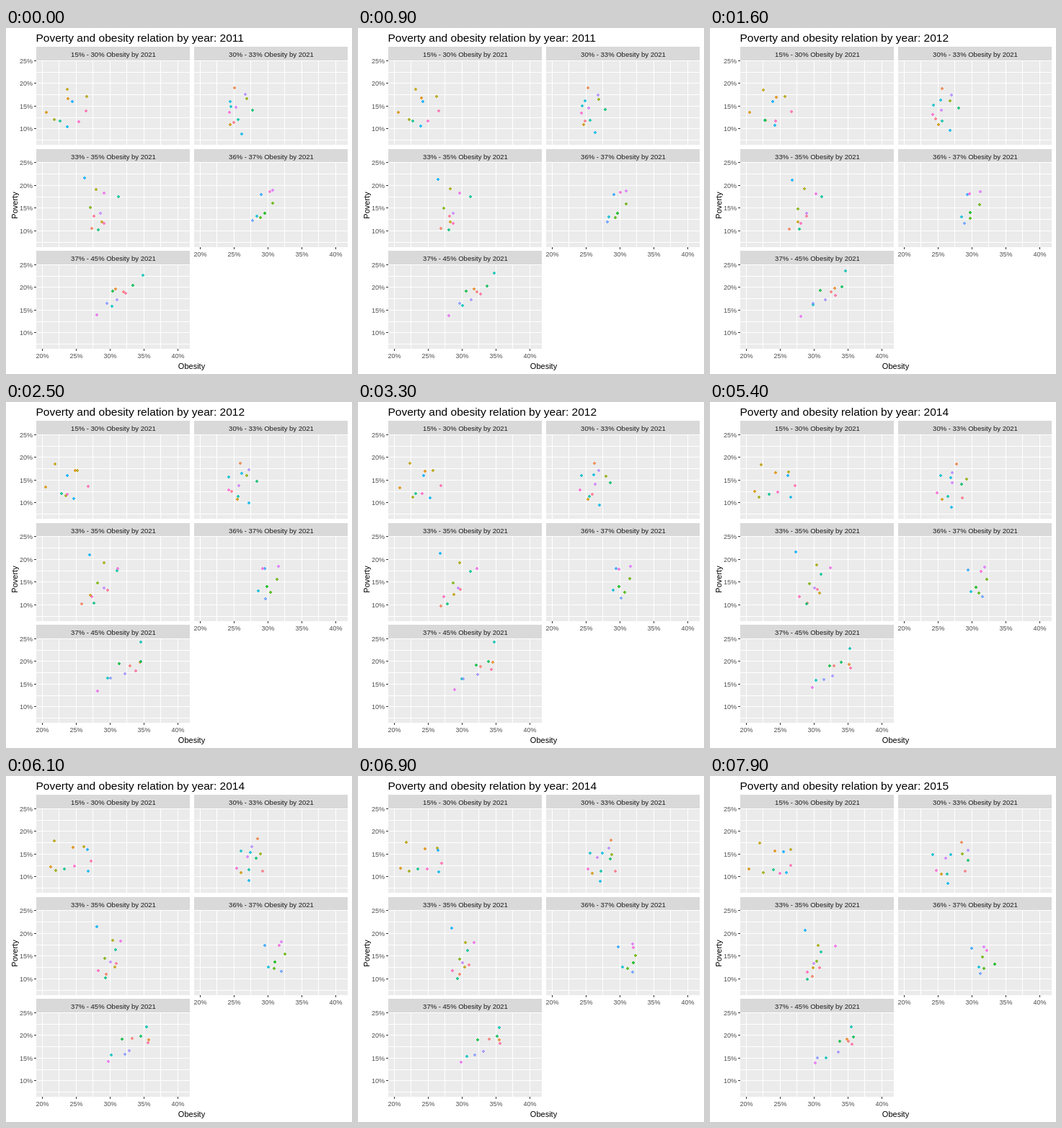
Write an HTML page with a canvas that moves like this. It is 480 by 480 pixels and loops after 8000 ms.

```html
<!DOCTYPE html>
<html lang="en">
<head>
<meta charset="utf-8">
<title>Poverty and obesity</title>
<style>
  html, body { margin: 0; width: 100%; height: 100%; overflow: hidden; background: #fff; }
  canvas { display: block; }
</style>
</head>
<body>
<canvas id="chart" width="480" height="480"></canvas>
<script>
const ctx = document.getElementById('chart').getContext('2d');
const LOOP = 8000, HOLD = 500, STEP = 100, STEPS_PER_YEAR = 20, FIRST_YEAR = 2011;
const FONT = '"Liberation Sans", Arial, sans-serif';

const panels = [
  { col: 0, row: 0, label: '15% - 30%' },
  { col: 1, row: 0, label: '30% - 33%' },
  { col: 0, row: 1, label: '33% - 35%' },
  { col: 1, row: 1, label: '36% - 37%', xAxis: true },
  { col: 0, row: 2, label: '37% - 45%', xAxis: true },
];

// Percent to pixel, within a panel
const scaleX = (panel, v) => Math.floor(50.3 + 218.73 * panel.col + (v - 20) * 9.41);
const scaleY = (panel, v) => Math.floor(139.9 + 141.475 * panel.row - (v - 10) * 6.3);

// Evenly spaced hues in polar LUV space, lightness 65, chroma 100
function hueColor(degrees) {
  const L = 65, C = 100, h = degrees * Math.PI / 180;
  const Y = ((L + 16) / 116) ** 3;
  const u = C * Math.cos(h) / (13 * L) + 0.1978;
  const v = C * Math.sin(h) / (13 * L) + 0.4683;
  const X = 9 * Y * u / (4 * v), Z = 3 * Y / v - 5 * Y - X / 3;
  const channel = c => {
    const g = c > 0.0031308 ? 1.055 * c ** (1 / 2.4) - 0.055 : 12.92 * c;
    return Math.round(255 * Math.min(1, Math.max(0, g)));
  };
  return 'rgb(' + [
    channel(3.2405 * X - 1.5371 * Y - 0.4985 * Z),
    channel(-0.9693 * X + 1.876 * Y + 0.0416 * Z),
    channel(0.0556 * X - 0.204 * Y + 1.0572 * Z),
  ].join() + ')';
}

const tracks = [];
const track = (panel, obesity, poverty) => tracks.push({ panel: panels[panel - 1], obesity, poverty });

// Panel, then yearly obesity and poverty rates
track(5, [32.0, 33.0, 32.4, 33.5, 35.6], [19.0, 19.0, 18.7, 19.3, 18.5]);
track(3, [27.4, 25.7, 28.4, 29.7, 29.8], [10.5, 10.1, 9.3, 11.2, 10.3]);
track(2, [25.1, 26.0, 26.8, 28.9, 28.4], [19.0, 18.7, 18.6, 18.2, 17.4]);
track(5, [30.9, 34.5, 34.6, 35.9, 34.5], [19.5, 19.8, 19.7, 18.9, 19.1]);
track(1, [23.8, 25.0, 24.1, 24.7, 24.2], [16.6, 17.0, 16.8, 16.4, 15.3]);
track(1, [20.7, 20.5, 21.3, 21.3, 20.2], [13.5, 13.5, 13.0, 12.0, 11.5]);
track(2, [24.5, 25.6, 25.0, 26.3, 25.3], [10.9, 10.7, 10.7, 10.8, 10.5]);
track(3, [28.8, 26.9, 31.1, 30.7, 29.7], [11.9, 12.0, 12.4, 12.5, 12.4]);
track(1, [23.7, 21.9, 22.9, 21.7, 22.1], [18.7, 18.4, 18.9, 17.7, 17.3]);
track(1, [26.6, 25.2, 26.4, 26.2, 26.8], [17.0, 17.1, 17.0, 16.5, 15.7]);
track(3, [28.0, 29.1, 30.3, 30.5, 30.7], [19.1, 19.2, 19.0, 18.3, 17.0]);
track(1, [21.8, 23.6, 21.8, 22.1, 22.7], [12.0, 11.6, 10.8, 11.4, 10.6]);
track(2, [27.0, 26.8, 29.6, 28.9, 28.6], [16.5, 15.9, 15.6, 14.8, 15.1]);
track(3, [27.1, 28.1, 29.4, 29.3, 30.8], [15.0, 14.7, 14.7, 14.4, 13.6]);
track(4, [30.8, 31.4, 31.8, 32.7, 31.3], [16.0, 15.6, 15.9, 15.2, 14.5]);
track(4, [29.0, 30.4, 31.3, 30.9, 32.1], [12.8, 12.7, 12.7, 12.2, 12.2]);
track(4, [29.6, 29.9, 30.0, 31.3, 34.2], [13.8, 14.0, 14.0, 13.6, 13.0]);
track(5, [30.4, 31.3, 33.2, 31.6, 34.6], [19.1, 19.4, 18.8, 19.1, 18.5]);
track(5, [33.4, 34.7, 33.1, 34.9, 36.2], [20.4, 19.9, 19.8, 19.8, 19.6]);
track(2, [27.8, 28.4, 28.9, 28.2, 30.0], [14.1, 14.7, 14.0, 14.1, 13.4]);
track(3, [28.3, 27.6, 28.3, 29.6, 28.9], [10.1, 10.3, 10.1, 10.1, 9.7]);
track(1, [22.7, 22.9, 23.6, 23.3, 24.3], [11.6, 11.9, 11.9, 11.6, 11.5]);
track(3, [31.3, 31.1, 31.5, 30.7, 31.2], [17.5, 17.4, 17.0, 16.2, 15.8]);
track(2, [25.7, 25.7, 25.5, 27.6, 26.1], [11.9, 11.4, 11.2, 11.5, 10.2]);
track(5, [34.9, 34.6, 35.1, 35.5, 35.6], [22.6, 24.2, 24.0, 21.5, 22.0]);
track(5, [30.3, 29.6, 30.4, 30.2, 32.4], [15.8, 16.2, 15.9, 15.5, 14.8]);
track(2, [24.6, 24.3, 24.6, 26.4, 23.6], [14.8, 15.5, 16.5, 15.4, 14.6]);
track(4, [28.4, 28.6, 29.6, 30.2, 31.4], [13.1, 13.0, 13.2, 12.4, 12.6]);
track(2, [24.5, 26.2, 26.2, 27.7, 26.7], [15.9, 16.4, 15.8, 15.2, 14.7]);
track(2, [26.2, 27.3, 26.7, 27.4, 26.3], [8.8, 10.0, 8.7, 9.2, 8.2]);
track(1, [23.7, 24.6, 26.3, 26.9, 25.6], [10.4, 10.8, 11.4, 11.1, 10.8]);
track(3, [26.3, 27.1, 26.4, 28.4, 28.8], [21.5, 20.8, 21.9, 21.3, 20.4]);
track(1, [24.5, 23.6, 25.4, 27.0, 25.0], [16.0, 15.9, 16.0, 15.9, 15.4]);
track(4, [29.1, 29.6, 29.4, 29.7, 30.1], [17.9, 18.0, 17.9, 17.2, 16.4]);
track(4, [27.8, 29.7, 31.0, 32.2, 31.0], [12.2, 11.2, 11.8, 11.5, 11.0]);
track(5, [29.6, 30.1, 30.4, 32.6, 29.8], [16.4, 16.3, 16.0, 15.8, 14.8]);
track(5, [31.1, 32.2, 32.5, 33.0, 33.9], [17.2, 17.2, 16.8, 16.6, 16.1]);
track(2, [26.7, 27.3, 26.5, 27.9, 30.1], [17.5, 17.2, 16.7, 16.6, 15.4]);
track(3, [28.6, 29.1, 30.0, 30.2, 30.0], [13.8, 13.7, 13.7, 13.6, 13.2]);
track(2, [25.4, 25.7, 27.3, 27.0, 26.0], [14.7, 13.7, 14.3, 14.3, 13.9]);
track(4, [30.8, 31.6, 31.7, 32.1, 31.7], [18.9, 18.3, 18.6, 18.0, 16.6]);
track(5, [28.1, 28.1, 29.9, 29.8, 30.4], [13.9, 13.4, 14.2, 14.2, 13.7]);
track(3, [29.2, 31.1, 33.7, 31.2, 33.8], [18.3, 17.9, 17.8, 18.3, 16.7]);
track(4, [30.4, 29.2, 30.9, 31.9, 32.4], [18.5, 17.9, 17.5, 17.2, 15.9]);
track(2, [24.4, 24.3, 24.1, 25.7, 24.5], [13.5, 12.8, 12.7, 11.7, 11.3]);
track(1, [25.4, 23.7, 24.7, 24.8, 25.1], [11.5, 11.8, 12.3, 12.2, 10.2]);
track(3, [29.2, 27.4, 27.2, 28.5, 29.2], [11.5, 11.7, 11.7, 11.8, 11.2]);
track(1, [26.5, 26.8, 27.2, 27.3, 26.4], [13.9, 13.5, 14.1, 13.2, 12.2]);
track(5, [32.4, 33.8, 35.1, 35.7, 35.6], [18.6, 17.8, 18.5, 18.3, 17.9]);
track(3, [27.7, 29.7, 29.8, 31.2, 30.7], [13.1, 13.2, 13.5, 13.2, 12.1]);
track(2, [25.0, 24.6, 27.8, 29.5, 29.0], [11.3, 12.6, 10.9, 11.2, 11.1]);
tracks.forEach((t, i) => t.color = hueColor(15 + 360 * i / tracks.length));

function rect(color, x, y, w, h) {
  ctx.fillStyle = color;
  ctx.fillRect(x, y, w, h);
}

function text(string, x, y, size, color, align) {
  ctx.font = `${size}px ${FONT}`;
  ctx.fillStyle = color;
  ctx.textAlign = align;
  ctx.fillText(string, x, y);
}

function drawPanel(panel) {
  const left = panel.col ? 261 : 42, width = 213;
  const stripTop = [26, 168, 309][panel.row];
  const top = [45, 186, 328][panel.row], bottom = [162, 304, 445][panel.row];
  rect('#d9d9d9', left, stripTop, width, top - stripTop);
  rect('#ebebeb', left, top, width, bottom - top);
  text(panel.label + ' Obesity by 2021', left + width / 2 + 0.5, stripTop + 14, 9.5, '#1a1a1a', 'center');

  for (let v = 20; v <= 40; v += 2.5) rect('#fff', scaleX(panel, v), top, 1, bottom - top);
  for (let v = 7.5; v <= 25; v += 2.5) rect('#fff', left, scaleY(panel, v), width, 1);

  if (panel.col === 0) for (let v = 10; v <= 25; v += 5) {
    const y = scaleY(panel, v);
    rect('#333', left - 3, y, 3, 1);
    text(v + '%', 37, y + 4, 9, '#4d4d4d', 'right');
  }
  if (panel.xAxis) for (let v = 20; v <= 40; v += 5) {
    const x = scaleX(panel, v);
    rect('#333', x, bottom, 1, 3);
    text(v + '%', x + 0.5, bottom + 13, 9, '#4d4d4d', 'center');
  }
}

function drawDot({ panel, obesity, poverty, color }, years) {
  const k = Math.min(3, Math.floor(years)), f = years - k;
  const at = values => values[k] + (values[k + 1] - values[k]) * f + 1e-6;
  const x = scaleX(panel, at(obesity)), y = scaleY(panel, at(poverty));
  ctx.fillStyle = color;
  ctx.beginPath();
  ctx.rect(x - 1, y - 2, 2, 4);
  ctx.rect(x - 2, y - 1, 4, 2);
  ctx.fill();
}

function draw(now) {
  const ms = now % LOOP;
  const step = ms < HOLD ? 0 : Math.floor((ms - HOLD) / STEP) + 1;
  const years = step / STEPS_PER_YEAR;

  rect('#fff', 0, 0, 480, 480);
  text('Poverty and obesity relation by year: ' + (FIRST_YEAR + Math.round(years)), 41.5, 19, 15.5, '#000', 'left');
  panels.forEach(drawPanel);
  text('Obesity', 257.5, 473, 11, '#000', 'center');
  ctx.save();
  ctx.translate(16, 246);
  ctx.rotate(-Math.PI / 2);
  text('Poverty', 0, 0, 11, '#000', 'center');
  ctx.restore();

  ctx.globalAlpha = 0.8;
  tracks.forEach(t => drawDot(t, years));
  ctx.globalAlpha = 1;
}

const start = performance.now();
function tick() {
  draw(performance.now() - start);
  requestAnimationFrame(tick);
}
tick();
</script>
</body>
</html>
```
